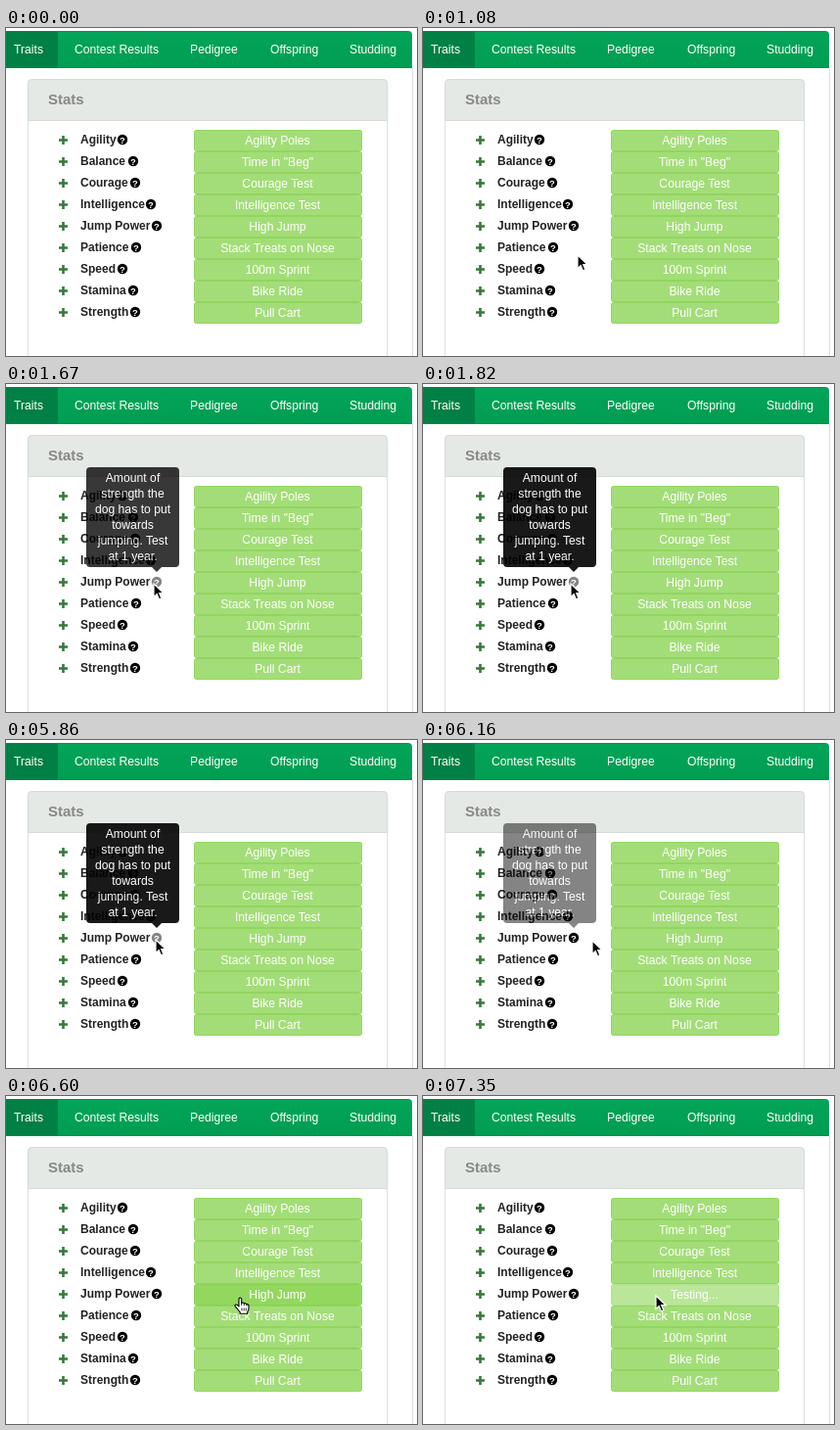
An HTML page for the animation above (8 s loop, 420 by 335 pixels).

```html
<!DOCTYPE html>
<html lang="en">
<head>
<meta charset="utf-8">
<title>Dog traits</title>
<style>
  html, body { margin: 0; width: 100%; height: 100%; overflow: hidden; background: #fff; }
  svg { display: block; width: 420px; height: 335px; }
  text { font: 12.2px "Liberation Sans", Arial, sans-serif; fill: #fff; }
  .mid { text-anchor: middle; }
  .label { font-size: 12px; font-weight: bold; fill: #222; }
  .title { font-size: 15px; font-weight: bold; fill: #888; }
  .mark { font-size: 9.5px; font-weight: bold; }
  .btn { fill: #a3dd78; stroke: #93d55f; }

  .anim { animation: 8s step-end infinite; }
  #arrow { animation-name: arrow; }
  #hand { animation-name: hand; }
  #tip { animation-name: tip; }
  #ring { animation-name: ring; }
  .help { animation-name: help; }
  .press { animation-name: press; }
  .idle { animation-name: idle; }
  .busy { animation-name: busy; }

  @keyframes arrow {
    0% { visibility: hidden; transform: translate(216px, 311px); }
    9.375% { visibility: visible; transform: translate(216px, 311px); }
    11.625% { transform: translate(168px, 255px); }
    13.5% { transform: translate(157px, 231px); }
    15.375% { transform: translate(155px, 218px); }
    17.125% { transform: translate(153px, 209px); }
    19% { transform: translate(152px, 205px); }
    20.875% { transform: translate(150px, 203px); }
    73.25% { transform: translate(152px, 203px); }
    75.125% { transform: translate(156px, 204px); }
    77% { visibility: visible; transform: translate(172px, 204px); }
    78.875% { visibility: hidden; transform: translate(237px, 203px); }
    90%, 100% { visibility: visible; transform: translate(237px, 203px); }
  }
  @keyframes hand {
    0% { visibility: hidden; transform: translate(203px, 205px); }
    78.875% { visibility: visible; transform: translate(203px, 205px); }
    80.75% { transform: translate(225px, 205px); }
    82.5% { visibility: visible; transform: translate(233px, 205px); }
    90%, 100% { visibility: hidden; transform: translate(233px, 205px); }
  }
  @keyframes tip {
    0% { opacity: 0; }
    19% { opacity: .2; }
    20.875% { opacity: .78; }
    22.75% { opacity: .9; }
    77% { opacity: .48; }
    78.875%, 100% { opacity: 0; }
  }
  @keyframes ring {
    0% { visibility: hidden; }
    90% { visibility: visible; }
    91.875%, 100% { visibility: hidden; }
  }
  @keyframes help {
    0% { fill: #000; }
    19% { fill: #858585; }
    77%, 100% { fill: #000; }
  }
  @keyframes press {
    0% { fill: #a3dd78; stroke: #93d55f; }
    78.875% { fill: #93d85e; stroke: #8ad152; }
    90%, 100% { fill: #bae69a; stroke: #b0e18c; }
  }
  @keyframes idle {
    0% { visibility: visible; }
    90%, 100% { visibility: hidden; }
  }
  @keyframes busy {
    0% { visibility: hidden; }
    90%, 100% { visibility: visible; }
  }
</style>
</head>
<body>
<svg viewBox="0 0 420 335">
  <defs>
    <linearGradient id="bar" x2="0" y2="1">
      <stop stop-color="#03a559"/>
      <stop offset="1" stop-color="#009d51"/>
    </linearGradient>
  </defs>

  <path d="M415.5 41V335" stroke="#ddd"/>
  <path d="M0 3H411Q415 3 415 7V41H0Z" fill="url(#bar)"/>
  <path d="M0 3H53V41H0Z" fill="#008045"/>
  <path d="M0 3.5H411M0 40.5H415" stroke="#008c49" stroke-opacity=".7" fill="none"/>
  <g id="nav"></g>

  <path d="M22.5 340V56.500a4 4 0 0 1 4-4H385.500a4 4 0 0 1 4 4V340" fill="#fff" stroke="#dde2de"/>
  <path d="M22.500 94.500V56.500a4 4 0 0 1 4-4H385.500a4 4 0 0 1 4 4V94.500Z" fill="#e4e9e5" stroke="#d5dcd7"/>
  <text class="title" x="43" y="78">Stats</text>
  <g id="rows"></g>

  <g id="tip" class="anim">
    <path d="M86 85H173a4 4 0 0 1 4 4V183a4 4 0 0 1-4 4H159L154 192L149 187H86a4 4 0 0 1-4-4V89a4 4 0 0 1 4-4Z"/>
    <g id="lines"></g>
  </g>

  <g id="ring" class="anim" fill="none">
    <circle cx="239.500" cy="203.500" r="10" stroke="#000"/>
    <circle cx="239.500" cy="203.500" r="9" stroke="#fff"/>
  </g>
  <path id="arrow" class="anim" d="M1 1V14.600L4.200 11.600L6.400 16.800L8.900 15.700L6.700 10.700H11.200Z" stroke="#fff" stroke-width="1.200"/>
  <g id="hand" class="anim">
    <path d="M5 10V2.500Q5 1 6.300 1T7.700 2.500V6.500Q9.500 5.300 10.300 7Q12 6 12.800 7.700Q15 7.300 15 9.500V12Q15 14 13.700 15.500V17.300H6.200V15.800Q4.500 14 3.300 12.200L1.200 9.800Q.5 8.300 2 8Q3.200 7.800 5 10Z" fill="#fff" stroke="#000" stroke-width="1.100" stroke-linejoin="round"/>
    <path d="M7.700 6.500V9M10.300 7V9.300M12.800 7.700V9.600M8 11.500V14.500M10.200 11.500V14.500M12.300 11.500V14.500" stroke="#000" stroke-width=".8"/>
  </g>
</svg>
<script>
  const tabs = [["Traits", 8], ["Contest Results", 70], ["Pedigree", 188], ["Offspring", 270], ["Studding", 351]];
  // label, help icon centre, button text
  const stats = [
    ["Agility", 119, "Agility Poles"],
    ["Balance", 130, 'Time in "Beg"'],
    ["Courage", 132, "Courage Test"],
    ["Intelligence", 148, "Intelligence Test"],
    ["Jump Power", 154, "High Jump"],
    ["Patience", 133, "Stack Treats on Nose"],
    ["Speed", 119, "100m Sprint"],
    ["Stamina", 130, "Bike Ride"],
    ["Strength", 132, "Pull Cart"]
  ];
  const hint = ["Amount of", "strength the", "dog has to put", "towards", "jumping. Test", "at 1 year."];

  const text = (str, x, y, cls = "") => `<text class="${cls}" x="${x}" y="${y}">${str}</text>`;
  const fill = (id, html) => { document.getElementById(id).innerHTML = html; };

  function row([label, icon, action], i) {
    const y = 104 + 22 * i;
    const live = label === "Jump Power";
    const cls = name => live ? "anim " + name : "";
    return `<path d="M54 ${y + 10.5}h9m-4.500 -4.500v9" stroke="#37783b" stroke-width="2.600"/>`
      + text(label, 76, y + 14, "label")
      + `<circle class="${cls("help")}" cx="${icon}" cy="${y + 10}" r="5.200"/>`
      + text("?", icon, y + 13.5, "mark mid")
      + `<rect class="btn ${cls("press")}" x="192.500" y="${y + .5}" width="171" height="21" rx="2"/>`
      + text(action, 277.5, y + 15, "mid " + cls("idle"))
      + (live ? text("Testing...", 277.5, y + 15, "mid anim busy") : "");
  }

  fill("nav", tabs.map(([name, x]) => text(name, x, 26)).join(""));
  fill("rows", stats.map(row).join(""));
  fill("lines", hint.map((line, i) => text(line, 129.5, 100 + 16 * i, "mid")).join(""));
</script>
</body>
</html>
```
